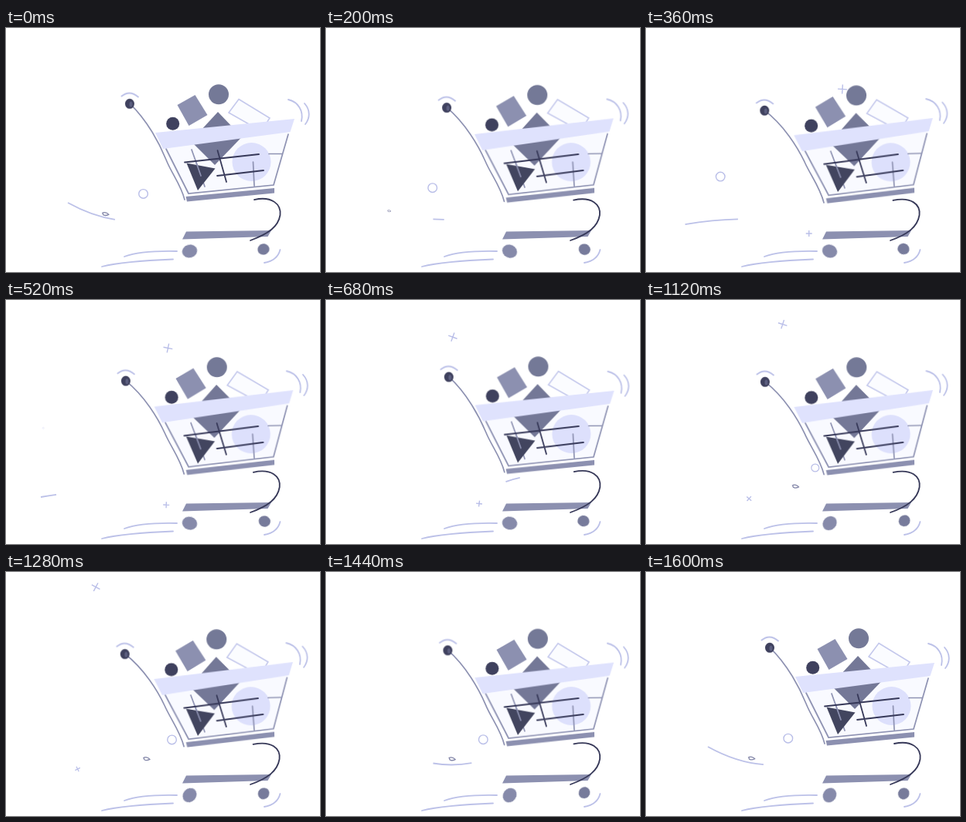
An HTML page for the animation above (1640 ms loop, 406 px wide and 317 px high).

```html
<!DOCTYPE html>
<html lang="en">
<head>
<meta charset="utf-8">
<title>Rolling cart</title>
<style>
  html, body { margin: 0; width: 100%; height: 100%; overflow: hidden; background: #fff; }
  svg { display: block; width: 100vw; height: 100vh; fill: none; }

  .soft { stroke: #bcc1e8; stroke-width: 1.8; }
  .grey { stroke: #8e92b2; stroke-width: 1.7; }
  .dark { stroke: #363858; stroke-width: 1.8; }
  .thin { stroke: #b9bee8; stroke-width: 1.4; }
  .soft, .dark, .grey { stroke-linecap: round; }
  .streak { stroke-linecap: butt; }

  /* The basket rocks over its right wheel; two sways fill one loop. */
  .sway { animation: 410ms cubic-bezier(.364, 0, .636, 1) -25ms infinite alternate; }
  #basket { animation-name: tilt; transform-origin: 330px 210px; }
  #knob { animation-name: dip; }
  #handle { animation-name: bend; }
  #hook { animation-name: flex; }
  .wheel { animation: spin 328ms linear infinite; }

  @keyframes tilt { to { transform: rotate(-1.4deg); } }
  @keyframes dip { to { transform: translate(-6.8px, 9px); } }
  @keyframes bend {
    from { d: path("M160 98 C183 120 199 151 207 171 C214 189 226 203 231 223"); }
    to { d: path("M153 107 C178 126 196 155 205 174 C212 190 225 207 230 227"); }
  }
  @keyframes flex {
    from { d: path("M321 223 C344 218 356 229 354.5 243 C352 258 340 267 316 276"); }
    to { d: path("M319.5 224 C343 219 355 229 353.5 243 C351 258 339 268 316 276"); }
  }
  @keyframes spin {
    from { transform: rotate(-15deg); }
    to { transform: rotate(345deg); }
  }
</style>
</head>
<body>
<svg viewBox="0 0 406 317">
  <!-- flying bits -->
  <path id="plusA" class="thin" d="M-6 0H6M0-6V6"/>
  <path id="plusB" class="thin" d="M-6 0H6M0-6V6"/>
  <path id="cross" class="thin" d="M-4 0H4M0-4V4"/>
  <circle id="ring" class="thin" r="5.8"/>
  <path id="drop" stroke="#8386a8" stroke-width="1.3" d="M-4-1.5C-2-3 2-2 4 .5C1 2-4 2.5-3.5-1Z"/>
  <path id="streakA" class="soft streak" pathLength="100" d="M205 244C165 256 125 252 80 227"/>
  <path id="streakB" class="soft streak" pathLength="100" d="M256 230C238 232 216 242 201 255"/>
  <path id="streakC" class="soft streak" pathLength="100" d="M155 249C120 247 85 249 45 256"/>

  <!-- chassis -->
  <path class="soft" d="M153 297Q174 289 221 290M124 310Q152 303 216 300.5M354.5 288Q351 302 334 305"/>
  <path fill="#8c90b0" d="M233 264.5L343 263L338.500 271L228 274.500Z"/>
  <path id="hook" class="dark sway" d="M321 223C344 218 356 229 354.5 243C352 258 340 267 316 276"/>
  <g transform="translate(237.5 290)"><ellipse class="wheel" rx="9.8" ry="8.4" fill="#868aaa"/></g>
  <g transform="translate(333.6 287.3)"><ellipse class="wheel" cx="-.7" rx="7.7" ry="7.2" fill="#777b9b"/></g>

  <!-- basket and goods -->
  <g id="basket" class="sway">
    <path class="soft" d="M365 93C378 96 385 108 382 121M386 98C394 107 393 117 387 125"/>
    <path fill="#8c90b0" d="M221.5 100L244.5 87L260.5 113L236.5 127Z"/>
    <circle cx="275" cy="86.3" r="13" fill="#747997"/>
    <circle cx="215.700" cy="124.3" r="8.5" fill="#3f415e"/>
    <path fill="#fbfcff" stroke="#c4c8ec" stroke-width="1.6" d="M301 92.5L341 117L330 134L288 110Z"/>
    <path fill="#f9faff" d="M203 156L367 135L347 205L235 216Z"/>
    <path fill="#747897" d="M274 109L305 141.5L270 178L239 147Z"/>
    <circle cx="317.5" cy="174" r="25" fill="#dde0fc"/>
    <path class="grey" d="M207 157L236 215L346 204L365 138M240 158L257 206M319.5 174L321 205M340 163.5H357"/>
    <path fill="#42455f" d="M233.5 175.500L270.5 182.5L248 211Z"/>
    <path class="grey" d="M245 172L252 192"/>
    <path class="dark" d="M231 174.5L327 164M273 192L333 185M273.5 159L285 200"/>
    <path fill="#dfe2fd" d="M193 136L373 118L367.5 135L203 157Z"/>
    <path fill="#8c90b0" d="M232.5 219L347 208V214.5L234 225.5Z"/>
  </g>
  <path id="handle" class="grey sway" d="M160 98C183 120 199 151 207 171C214 189 226 203 231 223"/>
  <g id="knob" class="sway">
    <path class="soft" d="M149.5 88.5Q160 80 171 89.5"/>
    <ellipse cx="160" cy="98.3" rx="6" ry="6.5" fill="#3f415e"/>
    <ellipse cx="161.5" cy="99" rx="2" ry="3.5" fill="#5c5f80"/>
  </g>
</svg>
<script>
const LOOP = 1640, STEP = 40;
const find = id => document.getElementById(id);

// Progress of a piece that lives from start for life ms, wrapping round the loop.
const age = (t, start, life) => ((t - start + LOOP) % LOOP) / life;

// Carries a shape along a curve: it pops in, speeds up by a power, and shrinks away.
function flyer(id, start, life, route, power, turn = 0) {
  const el = find(id);
  const curve = document.createElementNS("http://www.w3.org/2000/svg", "path");
  curve.setAttribute("d", route);
  const length = curve.getTotalLength();
  return t => {
    const p = Math.min(1, age(t, start, life));
    const way = p ** power;
    const { x, y } = curve.getPointAtLength(way * length);
    const size = Math.min(1, p * 16, (1 - p) * 10);
    el.setAttribute("transform", `translate(${x} ${y}) rotate(${way * turn}) scale(${size})`);
  };
}

// Draws a line from its first point while its tail catches up.
function streak(id, start, life) {
  const el = find(id);
  return t => {
    const p = Math.min(1, age(t, start, life));
    const head = Math.min(1, p * 2) * 100, tail = p ** 1.5 * 100;
    el.style.strokeDasharray = `${head - tail} 200`;
    el.style.strokeDashoffset = -tail;
  };
}

const bits = [
  flyer("plusA", 290, 590, "M273 88Q200 54 106 34", 1, 30),
  flyer("plusB", 830, 580, "M276 82Q190 16 66 17", 1, 36),
  flyer("cross", 280, 1100, "M211 267Q170 258 62 255", 2.4, 80),
  flyer("ring", 1060, 1120, "M219 218Q120 218 42 162", 2.3),
  flyer("drop", 880, 1017, "M199 242Q150 246 66 236", 2.2),
  streak("streakA", 1300, 540),
  streak("streakB", 570, 550),
  streak("streakC", 170, 400)
];

// One clock drives everything in even steps.
const sways = document.getAnimations();
sways.forEach(s => s.pause());
const born = performance.now();
function tick() {
  const t = (performance.now() - born) % LOOP;
  const now = Math.floor(t / STEP) * STEP;
  sways.forEach(s => { s.currentTime = now; });
  bits.forEach(draw => draw(now));
  requestAnimationFrame(tick);
}
tick();
</script>
</body>
</html>
```
